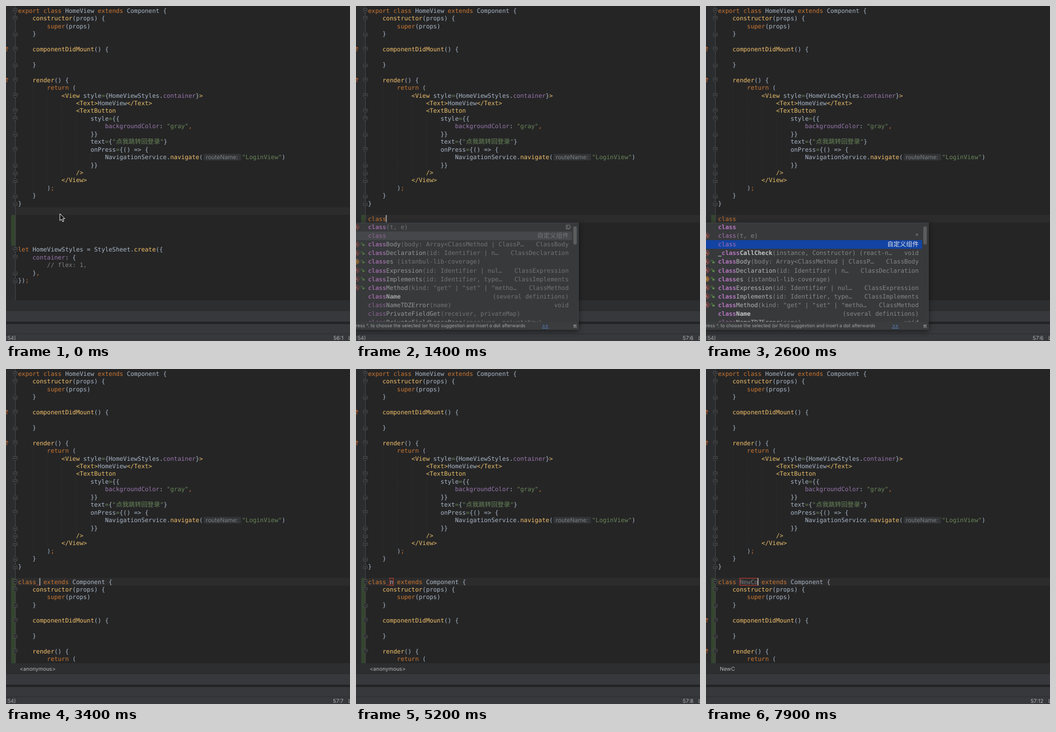
An HTML page for the animation above (8000 ms loop, 600x584 px).

```html
<!DOCTYPE html>
<html lang="en">
<head>
<meta charset="utf-8">
<title>Editor live template</title>
<style>
html, body { margin: 0; width: 100%; height: 100%; overflow: hidden; background: #252526; }
svg { display: block; width: 600px; height: 584px; }
text { white-space: pre; text-rendering: geometricPrecision; font: 10.5px "DejaVu Sans Mono", "Noto Sans CJK SC", monospace; }
text.ui { font-family: Inter, "Noto Sans", sans-serif; }
.cjk { font: 11px "Noto Sans CJK SC", "Noto Sans CJK", sans-serif; }
.popup { filter: drop-shadow(0 2px 4px rgba(0, 0, 0, .55)); }
</style>
</head>
<body>
<svg id="stage" viewBox="0 0 600 584"></svg>
<script>
(() => {
const LOOP = 8000, CHAR = 6.321, LINE = 13.44, LEFT = 21;
const BG = '#252526', GUTTER = '#2a2c2e', PANEL = '#36383b';

// Lower case: code colours. Upper case: bold.
const PALETTE = {
  d: '#a9b7c6', k: '#cc7832', f: '#f5c26b', p: '#9876aa', s: '#6a8759',
  t: '#e8bf6a', c: '#808080', g: '#85878a', m: '#ac72b4', w: '#b4b6b8',
  P: '#b776c0', W: '#c3c5c7', x: '#e0e4ec', u: '#73767a'
};

const stage = document.getElementById('stage');

function el(parent, tag, attrs = {}) {
  const node = document.createElementNS('http://www.w3.org/2000/svg', tag);
  for (const key in attrs) node.setAttribute(key, attrs[key]);
  parent.append(node);
  return node;
}
const group = (parent, attrs) => el(parent, 'g', attrs);
const rect = (parent, x, y, width, height, fill, more) =>
  el(parent, 'rect', { x, y, width, height, fill, ...more });
const path = (parent, d, stroke, more) =>
  el(parent, 'path', { d, stroke, fill: 'none', ...more });
const show = (node, on) => { node.style.display = on ? '' : 'none'; };

// "~k" switches to palette entry k.
function fillText(node, markup) {
  node.replaceChildren();
  const parts = markup.split(/~(\w)/);
  let key = 'd';
  parts.forEach((part, i) => {
    if (i % 2) { key = part; return; }
    for (const run of part.split(/([\u4e00-\u9fff]+)/)) {
      if (!run) continue;
      const span = el(node, 'tspan', { fill: PALETTE[key] });
      if (/[\u4e00-\u9fff]/.test(run)) span.setAttribute('class', 'cjk');
      if (key < 'a') span.setAttribute('font-weight', 'bold');
      span.textContent = run;
    }
  });
}
function text(parent, x, y, markup, more) {
  const node = el(parent, 'text', { x, y, ...more });
  fillText(node, markup);
  return node;
}
function label(parent, x, y, content, size, fill, more) {
  const node = el(parent, 'text', { x, y, fill, class: 'ui', ...more });
  node.style.fontSize = size + 'px';
  node.textContent = content;
  return node;
}

const mid = row => 8 + LINE * row;
const rowTop = row => mid(row) - 6.7;
const colX = col => LEFT + CHAR * col;
const code = (parent, row, col, markup) => text(parent, colX(col), mid(row) + 3.7, markup);

function fold(parent, row, end) {
  const k = end ? -1 : 1;
  const g = group(parent, { transform: `translate(16.2 ${mid(row) + .3}) scale(1 ${k})` });
  path(g, 'M-3.3 -3.6H3.3V1L0 4L-3.3 1Z', '#585b5d', { fill: BG, 'stroke-width': .8 });
  path(g, 'M-1.7 -.6H1.7', '#77797b', { 'stroke-width': .8 });
}
function overrideMark(parent, row) {
  const y = mid(row);
  path(parent, `M1.5 ${y + 4}V${y - 3}M-1 ${y - 1}L1.5 ${y - 3.5}L4 ${y - 1}`, '#b8602f', { 'stroke-width': 1.1 });
}
function squiggle(parent, row, from, to, color) {
  const y = mid(row) + 5.2;
  let d = `M${colX(from)} ${y}`;
  for (let x = colX(from) + 1.5, i = 0; x < colX(to); x += 1.5, i++) d += `L${x} ${y + (i % 2 ? 0 : 1.4)}`;
  path(parent, d, color, { 'stroke-width': .8 });
}
function guide(parent, col, first, last) {
  path(parent, `M${colX(col) + .5} ${rowTop(first)}V${rowTop(last + 1)}`, '#38393a', { 'stroke-dasharray': '1 2', 'stroke-width': .8 });
}

// [row, column, markup]
const body = [
  [1, 4, '~fconstructor~d(props) {'],
  [2, 8, '~ksuper~d(props)'],
  [3, 4, '}'],
  [5, 4, '~fcomponentDidMount~d() {'],
  [7, 4, '}'],
  [9, 4, '~frender~d() {'],
  [10, 8, '~kreturn ~d(']
];
const view = [
  [11, 12, '~t<View ~dstyle~s=~d{HomeViewStyles.~pcontainer~d}~t>'],
  [12, 16, '~t<Text>~dHomeView~t</Text>'],
  [13, 16, '~t<TextButton'],
  [14, 20, 'style~s=~d{{'],
  [15, 24, '~pbackgroundColor~d: ~s"gray"~k,'],
  [16, 20, '}}'],
  [17, 20, 'text~s=~d{~s"点我跳转回登录"~d}'],
  [18, 20, 'onPress~s=~d{() => {'],
  [19, 24, 'NavigationService.~fnavigate~d('],
  [20, 20, '}}'],
  [21, 16, '~t/>'],
  [22, 12, '~t</View>'],
  [23, 8, ')~k;'],
  [24, 4, '}'],
  [25, 0, '}']
];
const styles = [
  [31, 0, '~klet ~dHomeViewStyles = StyleSheet.~fcreate~d({'],
  [32, 4, '~pcontainer~d: {'],
  [33, 8, '~c// flex: 1,'],
  [34, 4, '}~k,'],
  [35, 0, '})~k;']
];
const write = (parent, lines, shift = 0) =>
  lines.forEach(([row, col, markup]) => code(parent, row + shift, col, markup));
const folds = (parent, starts, ends) => {
  starts.forEach(row => fold(parent, row, false));
  ends.forEach(row => fold(parent, row, true));
};

// Editor
rect(stage, 0, 0, 600, 584, BG);
rect(stage, 0, 0, 16, 513, GUTTER);
const rowBar = rect(stage, 17, 0, 583, LINE, '#2d2c2d');
const changeBar = rect(stage, 9, 0, 7, 0, '#35452f');
path(stage, 'M16.4 0V513', '#4a4c4e', { 'stroke-width': .9 });

const fixed = group(stage);
[[4, 2, 2], [4, 10, 23], [8, 11, 22], [12, 12, 21], [16, 14, 20], [20, 15, 15], [20, 19, 19]]
  .forEach(g => guide(fixed, ...g));
code(fixed, 0, 0, '~kexport class ~dHomeView ~kextends ~dComponent {');
write(fixed, body);
write(fixed, view);
rect(fixed, 344.5, mid(19) - 5.7, 65.5, 11.6, '#323436', { rx: 2 });
label(fixed, 348.5, mid(19) + 3.2, 'routeName:', 10.2, '#7d8083');
text(fixed, 411.5, mid(19) + 3.7, '~s"LoginView"~d)');
folds(fixed, [0, 1, 5, 9, 11, 13, 14, 18], [3, 7, 16, 20, 21, 22, 24, 25]);
[5, 9].forEach(row => overrideMark(fixed, row));

const tail = group(stage);
write(tail, styles);
folds(tail, [31, 32], [34, 35]);

// Inserted class
const warnings = group(stage);
[[27, 15, 10], [28, 22, 1], [32, 23, 1], [36, 12, 1]].forEach(([row, col, n]) =>
  rect(warnings, colX(col), rowTop(row), n * CHAR, LINE, '#4a4936'));
squiggle(warnings, 29, 8, 20, '#b8483c');
squiggle(warnings, 32, 4, 21, '#a08a45');

const added = group(stage);
write(added, body, 27);
folds(added, [27, 28, 32, 36], [30, 34]);
const addedMarks = group(added);
[32, 36].forEach(row => overrideMark(addedMarks, row));
const gapError = group(added);
squiggle(gapError, 27, 5, 6, '#b8483c');

const typed = code(stage, 27, 0, '');
const nameBox = rect(stage, colX(6), rowTop(27) + .5, 0, LINE - 1, 'none', { stroke: '#c23b2e', 'stroke-width': 1 });
const caret = rect(stage, 0, 0, 1.2, LINE - .6, '#d4d4d4');

// Bottom bars
rect(stage, 0, 513, 600, 71, '#2c2e30');
rect(stage, 0, 531, 600, 19.5, PANEL);
path(stage, 'M0 531H600', '#252627');
rect(stage, 0, 550.5, 600, 4, '#222325');
rect(stage, 0, 554.5, 600, 29.5, PANEL);
path(stage, 'M0 571.5H600', '#2b2d2f');
const crumb = label(stage, 24, 525.5, '', 9.2, '#b4b6b8');
const elapsed = label(stage, 0, 582.4, ':54)', 9.2, '#a9abad');
const position = label(stage, 588.5, 582.4, '', 9.2, '#b4b6b8', { 'text-anchor': 'end' });
label(stage, 597, 582.4, 'LF', 9.2, '#b4b6b8');

const pointer = group(stage, { transform: 'translate(94 362)' });
el(pointer, 'path', { d: 'M0 0V12.2L2.8 9.6L4.8 14L6.8 13.1L4.9 8.8H8.6Z', fill: '#111', stroke: '#eee', 'stroke-width': 1 });

// Completion popups
function badge(parent, x, y, fill) {
  el(parent, 'circle', { cx: x, cy: y, r: 4.6, fill, stroke: '#a0605c', 'stroke-width': .7 });
  path(parent, `M${x - 1.8} ${y - 2.5}H${x - .7}L${x + 2} ${y + 2.6}M${x + .2} ${y - .2}L${x - 2} ${y + 2.6}`, '#d49a90', { 'stroke-width': .8 });
}
function lock(parent, x, y) {
  rect(parent, x - 1, y - .3, 4, 3, '#5d8a48');
  path(parent, `M${x - 3.3} ${y}V${y - 1.4}a1.5 1.5 0 0 1 3 0V${y}`, '#5d8a48', { 'stroke-width': .9 });
}
function spinner(parent, x, y) {
  const wheel = group(group(parent, { transform: `translate(${x} ${y})` }));
  for (let i = 0; i < 8; i++)
    path(wheel, 'M0 -2.2V-5', '#b0b2b4', { transform: `rotate(${i * 45})`, opacity: .25 + i * .1 });
  return wheel;
}
const PITCH = 15.08, POP_TOP = 378;

// Item: [markup, right text, icon]; icon is f (function), l (with lock), o (orange with lock)
function popup(x, width, bottom, items, selected, color, opts) {
  const g = group(stage, { class: 'popup' });
  rect(g, x, POP_TOP, width, bottom - POP_TOP, '#37393b', { stroke: '#47494b', 'stroke-width': .8 });
  rect(g, x, POP_TOP + selected * PITCH, width - opts.inset, PITCH, color);
  const list = group(g, { opacity: opts.dim ? .75 : 1 });
  items.forEach(([markup, right, icon], i) => {
    const y = POP_TOP + 7.4 + i * PITCH;
    if (icon) badge(list, opts.iconX, y, icon === 'o' ? '#8a6420' : '#5b3436');
    if (icon === 'l' || icon === 'o') lock(list, 12, y);
    text(list, icon && opts.indent ? 29 : LEFT, y + 3.7, markup);
    if (right) text(list, opts.right, y + 3.7, (i === selected && opts.bright ? '~x' : '~g') + right, { 'text-anchor': 'end' });
  });
  rect(g, x, bottom - 13.3, width, 13.3, '#3a3c3e');
  label(g, opts.hintX, bottom - 3.8, 'Press ^. to choose the selected (or first) suggestion and insert a dot afterwards', 8.1, '#a2a4a6');
  label(g, opts.hintX + 330, bottom - 3.8, opts.link, 8.4, '#5a8fe0', { 'text-decoration': 'underline' });
  label(g, x + width - 9, bottom - 3.4, 'π', 9.5, '#c0c2c4');
  if (opts.inset > 2) rect(g, 379, 384, 6, 32, '#5a5c5e', { rx: 3 });
  return g;
}

const common = [
  ['~Pclass~wBody~g(body: Array<ClassMethod | ClassP…', 'ClassBody', 'l'],
  ['~Pclass~wDeclaration~g(id: Identifier | n…', 'ClassDeclaration', 'l'],
  ['~Pclass~wes~g (istanbul-lib-coverage)', '', 'o'],
  ['~Pclass~wExpression~g(id: Identifier | nul…', 'ClassExpression', 'l'],
  ['~Pclass~wImplements~g(id: Identifier, type…', 'ClassImplements', 'l'],
  ['~Pclass~wMethod~g(kind: "get" | "set" | "metho…', 'ClassMethod', 'l'],
  ['~Pclass~WName', '(several definitions)', ''],
  ['~mclass~wNameTDZError~g(name)', 'void', ''],
  ['~mclass~wPrivateFieldGet~g(receiver, privateMap)', '', ''],
  ['~mclass~wPrivateFieldLooseBase~g(receiver, privateKey)', '', '']
];
const template = ['~mclass', '自定义组件', ''];
const wide = { inset: 11, iconX: 1, right: 371, hintX: -5.5, link: '>>' };
const wideList = (items, selected, color, more) =>
  popup(-12, 400, 564, items, selected, color, { ...wide, ...more });

const longer = [
  ['~Pclass', '', ''],
  ['~mclass~g(t, e)', '*', 'f'],
  template,
  ['~W_~Pclass~WCallCheck~g(instance, Constructor) (react-n…', 'void', 'f'],
  ...common.slice(0, 8)
];
const popups = {
  first: popup(13, 349, 467, [
    ['~Pclass', '', ''],
    ['~W_~Pcla~WssCallCheck~g(instance, Constructor) (rea…', 'void', 'f'],
    ['~Wde~Pcla~Wre', '', ''],
    ['~W_create~PCla~Wss~g(Constructor, protoProps, staticProp…', '', 'f'],
    template
  ], 0, '#46494c', { inset: 1, iconX: 21, indent: true, right: 346, hintX: 18, link: '>', dim: true }),
  second: wideList([['~Pclass~g(t, e)', '*', 'f'], template, ...common], 1, '#45474a', { dim: true }),
  idle: wideList(longer, 2, '#45474a'),
  picked: wideList(longer, 2, '#1343a3', { bright: true })
};
const wheels = [spinner(popups.first, 344.5, 385), spinner(popups.second, 370, 385)];

// Each step keeps the values of the one before; key is the time of the last key press.
const steps = [
  [0, { key: -500, row: 26, col: 0, pos: '56:1', input: '', name: '', list: '', crumb: '', mouse: true, timer: true, insert: false, warn: false, marks: false }],
  [500, { key: 500, row: 27, pos: '57:1', mouse: false }],
  [800, { key: 800, input: '~dc', col: 1 }],
  [900, { key: 900, input: '~dcl', col: 2 }],
  [1000, { key: 1000, input: '~dcla', col: 3, list: 'first' }],
  [1100, { key: 1100, input: '~dclas', col: 4 }],
  [1200, { key: 1200, input: '~kclass', col: 5 }],
  [1300, { list: 'second' }],
  [1700, { list: 'idle' }],
  [2000, { key: 2000, list: 'picked' }],
  [3100, { key: 3100, list: '', insert: true, col: 6 }],
  [3200, { crumb: '<anonymous>' }],
  [3600, { warn: true }],
  [4000, { timer: false }],
  [4700, { key: 4700, name: 'n', col: 7, warn: false }],
  [5800, { key: 5800, name: '', col: 6 }],
  [6100, { warn: true }],
  [6700, { key: 6700, name: 'N', col: 7, warn: false }],
  [6900, { key: 6900, name: 'Ne', col: 8, crumb: 'N' }],
  [7100, { key: 7100, name: 'New', col: 9, crumb: 'Ne' }],
  [7400, { key: 7400, name: 'NewC', col: 10, crumb: 'New', marks: true }],
  [7700, { key: 7700, name: 'NewCo', col: 11, crumb: 'NewC' }]
];
let past = {};
const states = steps.map(([at, change]) => (past = { ...past, ...change, at }));

// The status bar counts the space after the typed keyword as one more column.
const column = s => s.col + (s.input === '~kclass' && !s.insert ? 1 : 0) + 1 - (s.input === '~kclass' && !s.insert ? 1 : 0);

let current;
function apply(s) {
  const shift = s.row === 27 ? 1 : 0;
  rowBar.setAttribute('y', rowTop(s.row));
  changeBar.setAttribute('y', rowTop(27));
  changeBar.setAttribute('height', s.insert ? 513 - rowTop(27) : LINE * (4 + shift));
  tail.setAttribute('transform', `translate(0 ${shift * LINE})`);
  show(tail, !s.insert);
  show(added, s.insert);
  show(addedMarks, s.marks);
  show(gapError, s.name.length < 2);
  show(warnings, s.warn);
  const tone = s.name.length > 1 ? 'u' : 'd';
  fillText(typed, s.insert ? `~kclass ~${tone}${s.name}~k extends ~dComponent {` : s.input);
  nameBox.setAttribute('width', s.name.length * CHAR);
  show(nameBox, s.name);
  caret.setAttribute('x', colX(s.col) - .5);
  caret.setAttribute('y', rowTop(s.row) + .3);
  crumb.textContent = s.crumb;
  position.textContent = s.row === 27 ? '57:' + column(s) : s.pos;
  show(elapsed, s.timer);
  show(pointer, s.mouse);
  for (const key in popups) show(popups[key], key === s.list);
}
function frame(now) {
  const t = now % LOOP;
  const s = states.findLast(state => state.at <= t);
  if (s !== current) apply(current = s);
  show(caret, (t - s.key) % 1000 < 500);
  const turn = Math.floor(t / 100) * 45 % 360;
  wheels.forEach(wheel => wheel.setAttribute('transform', `rotate(${turn})`));
  requestAnimationFrame(frame);
}
frame(0);
})();
</script>
</body>
</html>
```
